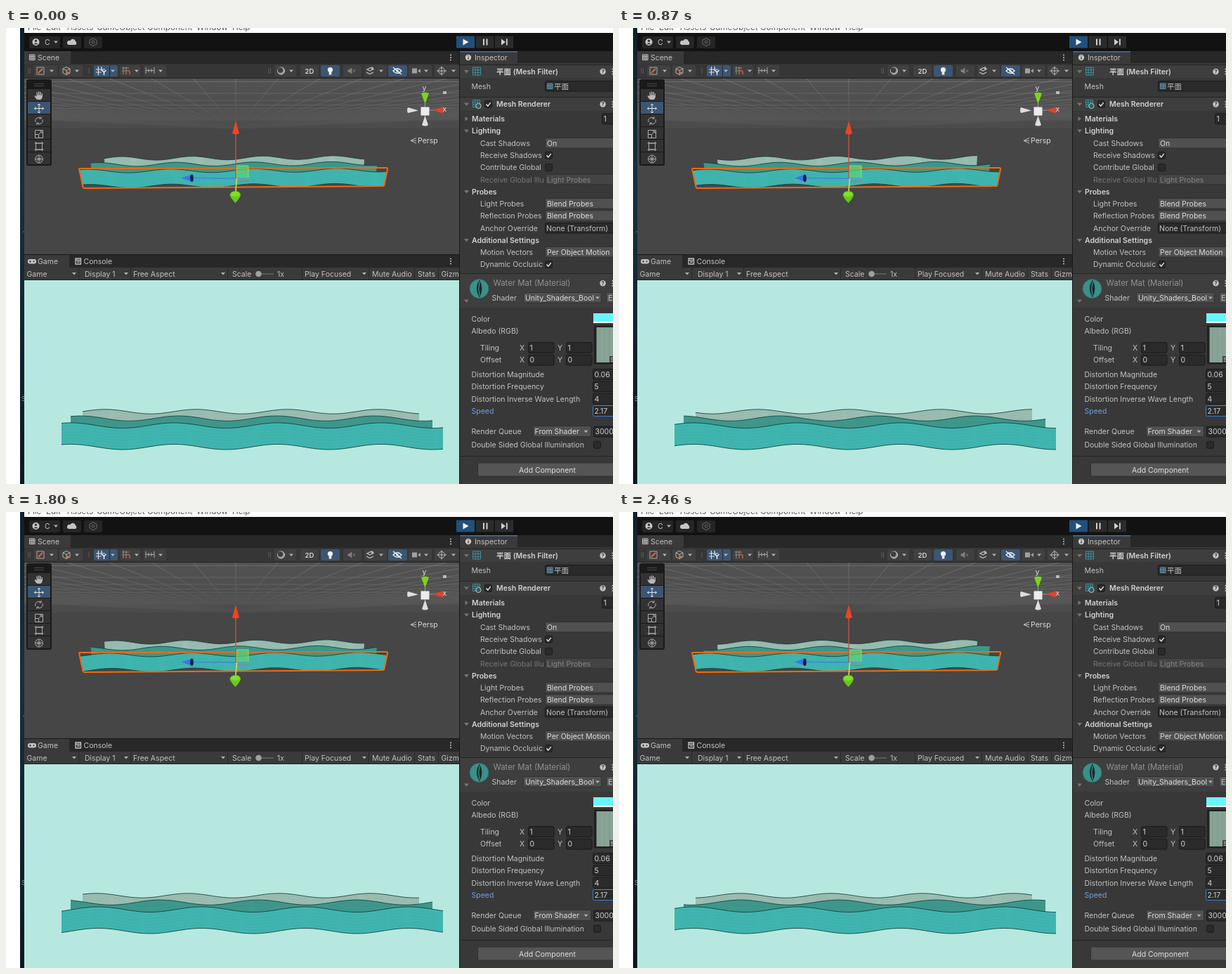
These frames come from a looping animation (864 px wide and 649 px high, 2.49 s). An HTML page:

```html
<!DOCTYPE html>
<html lang="en">
<head>
<meta charset="utf-8">
<title>Water shader editor</title>
<style>
html, body { margin: 0; width: 100%; height: 100%; overflow: hidden; background: #fff; }
svg { display: block; width: 864px; height: 649px; }
text { font-family: Inter, "Noto Sans CJK SC", "Noto Sans CJK", sans-serif; font-size: 10.5px; white-space: pre; }
</style>
</head>
<body>
<svg id="stage" viewBox="0 0 864 649" xmlns="http://www.w3.org/2000/svg"></svg>
<script>
const LOOP = 2490, STEP = 30, TAU = Math.PI * 2;
const INK = '#c2c2c2', FIELD = '#2a2a2a', DROP = '#505050', ACTIVE = '#3b5674';
const out = [];
const add = s => out.push(s);

// Drawing helpers
const rect = (x, y, w, h, fill, extra = '') =>
  add(`<rect x="${x}" y="${y}" width="${w}" height="${h}" fill="${fill}" ${extra}/>`);
const text = (x, mid, s, fill = INK, extra = '') =>
  add(`<text x="${x}" y="${mid + 3.8}" fill="${fill}" ${extra}>${s}</text>`);
const bold = (x, mid, s) => text(x, mid, s, '#d2d2d2', 'font-weight="600"');
const path = (d, fill = 'none', stroke = 'none', w = 1, extra = '') =>
  add(`<path d="${d}" fill="${fill}" stroke="${stroke}" stroke-width="${w}" ${extra}/>`);
const circle = (x, y, r, fill = 'none', stroke = 'none', w = 1) =>
  add(`<circle cx="${x}" cy="${y}" r="${r}" fill="${fill}" stroke="${stroke}" stroke-width="${w}"/>`);
const caret = (x, y) => path(`M${x - 3} ${y - 1.5}h6l-3 3.5z`, '#b0b0b0');
const fold = (x, y) => path(`M${x - 3} ${y - 2}h7l-3.5 4.5z`, '#747474');
const dots = (x, y) => [-3.5, 0, 3.5].forEach(d => circle(x, y + d, 1, '#c4c4c4'));
const box = (x, y, w, h, fill, stroke = '#232323') =>
  rect(x + .5, y + .5, w - 1, h - 1, fill, `rx="2" stroke="${stroke}"`);
const check = (x, y, on) => {
  box(x - 5.5, y - 5.5, 11, 11, FIELD, '#1b1b1b');
  if (on) path(`M${x - 3} ${y}l2.3 2.6 4-5`, 'none', '#e2e2e2', 1.5);
};
const help = y => {
  circle(849.5, y, 4.2, '#c4c4c4');
  add(`<text x="847.4" y="${y + 2.8}" fill="#333" style="font-size:7.5px" font-weight="700">?</text>`);
  dots(863.5, y);
};
const mesh = (x, y, s, color) => {
  let d = '';
  for (let i = 0; i <= 3; i++) d += `M${x + i * s / 3} ${y}v${s}M${x} ${y + i * s / 3}h${s}`;
  path(d, 'none', color, 1);
};

add(`<defs>
<clipPath id="view"><rect x="26" y="72" width="619" height="250"/></clipPath>
<linearGradient id="sky" x2="0" y2="1"><stop stop-color="#525252"/><stop offset="1" stop-color="#4b4b4b"/></linearGradient>
<linearGradient id="fade" x2="0" y2="1"><stop stop-color="#fff" stop-opacity=".5"/><stop offset=".55" stop-color="#fff" stop-opacity=".25"/><stop offset="1" stop-color="#fff" stop-opacity=".02"/></linearGradient>
<mask id="far"><rect x="26" y="72" width="619" height="72" fill="url(#fade)"/></mask>
<linearGradient id="desk" x2="0" y2="1"><stop stop-color="#10202c"/><stop offset=".35" stop-color="#173040"/><stop offset="1" stop-color="#0c1721"/></linearGradient>
</defs>`);

function frameBars() {
  rect(0, 0, 864, 649, '#fff');
  rect(20, 0, 6, 649, 'url(#desk)');
  text(22, 527, 'S', '#8b949a', 'style="font-size:9px"');
  circle(25, 290, .8, '#7d8890');
  rect(26, 0, 838, 7, '#fff');
  [['File', 31], ['Edit', 57], ['Assets', 87], ['GameObject', 129], ['Component', 201],
   ['Window', 271], ['Help', 322]].forEach(([s, x]) =>
    add(`<text x="${x}" y="2.6" fill="#555" style="font-size:11.7px">${s}</text>`));
  rect(26, 7, 838, 642, '#191919');
  rect(26, 7, 838, 26, '#121212');

  [[33, 44], [81, 26], [111, 26]].forEach(([x, w]) => rect(x, 12, w, 17, '#252525', 'rx="2"'));
  circle(42.5, 20, 5, '#c8c8c8');
  circle(42.5, 18.3, 1.7, '#333');
  path('M39.4 23.3q3.1-4 6.2 0z', '#333');
  text(55, 20, 'C');
  caret(71, 20);
  path('M89 24h10a3 3 0 0 0 0-5a4 4 0 0 0-7.5-1a3 3 0 0 0-2.5 6z', '#c4c4c4');
  path('M124 14.5l5 2.8v5.6l-5 2.8-5-2.8v-5.6z', 'none', '#6a6a6a');
  circle(124, 20, 2, 'none', '#6a6a6a');

  rect(641, 11.5, 26, 17, '#22507c');
  rect(668.5, 11.5, 26, 17, '#2b2b2b');
  rect(696, 11.5, 26, 17, '#2b2b2b');
  path('M650.5 15.5v9l8-4.5z', '#f2f2f2');
  path('M679 15.5h2v9h-2zM683.5 15.5h2v9h-2zM705 15.5v9l6-4.5zM712 15.5h1.8v9h-1.8z', '#d0d0d0');
}

function sceneBars() {
  rect(26, 33, 619, 18, '#282828');
  rect(26, 33, 66, 18, '#3a3a3a');
  mesh(33.5, 38, 7.5, '#c4c4c4');
  text(45, 42, 'Scene');
  dots(633, 42);
  rect(26, 51, 619, 21, '#363636');
  rect(26, 71, 619, 1, '#232323');
  [[40, 33], [76, 33], [162, 29], [196, 32], [382, 31], [419, 26], [480, 26], [510, 32],
   [573, 33], [610, 35]].forEach(([x, w]) => rect(x, 53, w, 16, '#404040', 'rx="2"'));
  [[125, 34], [448, 27], [544, 27]].forEach(([x, w]) => rect(x, 53, w, 16, ACTIVE, 'rx="2"'));
  rect(147, 53, 1, 16, '#2b2b2b');
  [65, 101, 152, 186, 220, 406, 534, 598, 637].forEach(x => caret(x, 61));
  path('M32 57v8M34.5 57v8M118 57v8M374 57v8M376.5 57v8', 'none', '#5a5a5a');
  // pivot, cube, grid, snap and ruler
  path('M44 56h10v10h-10z', 'none', '#a8a8a8');
  path('M46 64l6-6', 'none', '#e0703c', 1.8);
  path('M86 55.5l5 2.5v6l-5 2.5-5-2.5v-6zM81 58l5 2.5 5-2.5M86 60.5v6', 'none', '#b4b4b4');
  circle(88, 64, 2, '#e06a35');
  path('M128 59h13M128 63h8M131.5 55v12M136 55v6', 'none', '#e0e0e0', 1.2);
  path('M136.5 60l3 3 3-3M139.5 63v4', 'none', '#fff', 1.3);
  path('M165 57h10M165 61h6M167 55v11M171 55v6', 'none', '#8c8c8c');
  path('M171 66v-3a2.5 2.5 0 0 1 5 0v3', 'none', '#c05f45', 1.5);
  path('M199 56v9M211 56v9M199 60.5h12M203 58v5M207 58v5', 'none', '#aaa');
  // view options
  circle(391.5, 61, 5, '#999', '#ccc');
  circle(390.5, 60, 3.8, '#3d3d3d');
  text(425.5, 61, '2D', '#d8d8d8', 'font-weight="600" style="font-size:9.5px"');
  circle(461.5, 59.5, 3.6, '#f0f0f0');
  rect(459.7, 63, 3.6, 3.5, '#f0f0f0');
  path('M487 59.5h2l3-2.5v8l-3-2.5h-2zM494 59l3 4m0-4l-3 4', '#808080', '#808080', .8);
  path('M514 59l5-2.5 4 2-5 2.5zM513 63l5 2.5 5-2.5M521 55v4M519 57h4', 'none', '#c4c4c4', 1.2);
  path('M551 61q6-6.5 12 0q-6 6.5-12 0zM551 56l12 10', 'none', '#eee', 1.3);
  circle(557, 61, 1.8, '#eee');
  rect(578, 57.5, 7, 7, '#a0a0a0');
  path('M586 61l4-3v6z', '#a0a0a0');
  circle(620, 61, 4.5, 'none', '#bbb');
  path('M613 61h14M620 54.5v13', 'none', '#bbb');
}

function sceneView() {
  rect(26, 72, 619, 250, '#464646');
  rect(26, 72, 619, 71, 'url(#sky)');
  let d = '';
  for (let k = -26; k <= 26; k++) d += `M327 143L${327 + k * 60} 72`;
  for (let j = 3; j < 18; j++) d += `M26 ${143 - 200 / j}H645`;
  add('<g clip-path="url(#view)"><g mask="url(#far)">');
  path(d, 'none', '#a8a8a8', .7);
  add('</g></g>');

  // tool column
  rect(29, 73, 36, 123, '#1a1a1a', 'rx="3"');
  path('M40 79.5h14M40 82.5h14', 'none', '#4a4a4a');
  for (let i = 0; i < 6; i++) rect(31, 87 + i * 18, 32, 17, i === 1 ? ACTIVE : '#323232');
  path('M43 101l-2.5-4 1-1 2 1.5v-6h1.3v4h1v-5h1.4v5h1v-4.5h1.4v5h1v-3h1.3v5q-1 4-3.5 4h-3z', '#b8b8b8');
  path('M47 108v13M40.5 114.5h13M45 110l2-2 2 2M45 119l2 2 2-2M42.5 112.5l-2 2 2 2M51.5 112.5l2 2-2 2', 'none', '#e4e4e4');
  path('M42 134a5 5 0 0 1 8-5.5M52 130a5 5 0 0 1-8 5.5M50 126v3h-3M44 138v-3h3', 'none', '#acacac');
  path('M41.5 145.5h11v11h-11zM41.5 151.5h5v5M47 151l4-4M48 147h3v3', 'none', '#acacac');
  path('M42.5 164h9v9h-9zM40.5 164h13M40.5 173h13M42.5 162v13M51.5 162v13', 'none', '#acacac');
  circle(47, 186.5, 5.5, 'none', '#acacac');
  path('M42 186.5h10M47 181.5v10M44 183.5l6 6M50 183.5l-6 6', 'none', '#acacac');

  // orientation widget
  path('M596.5 117V100M596.5 117H620M596.5 117V138', 'none', '#999', 1);
  path('M591 93q5.5-2.5 11 0l-5.5 15z', '#7bd51c');
  path('M622 112.5q2.5 4.5 0 9l-15-4.5z', '#e0432a');
  path('M572 113q-2 4 0 8l15-3.5z', '#dedede');
  path('M592 138q4.5 3 9 0l-4.5-13z', '#dedede');
  rect(590.5, 112.5, 12, 12, '#ececec');
  text(592.5, 85.5, 'y', '#ddd');
  text(621.5, 115, 'x', '#ddd');
  rect(622, 90, 5, 4, '#bbb');
  path('M584 156.5l-8 3.8 8 3.8M576 160.3h8', 'none', '#ccc', .9);
  text(586, 160.3, 'Persp', '#d8d8d8');
}

function gizmo() {
  path('M104 200.5Q104 200 106 200L541 199Q543.5 199 543 201L538.5 223Q538 225 536 225L112 228Q110 228 109.5 226Z', 'none', '#f26a10', 2);
  rect(328, 196, 17, 17.5, '#5fd07a', 'fill-opacity=".75"');
  path('M328 213V196H345V213', 'none', '#8ee04a', 1);
  path('M328 214H345', 'none', '#5f8bff', 1);
  path('M329 218H346', 'none', '#d4694a', 1);
  path('M327 214V150', 'none', '#c25440', 1.4);
  path('M322 150q5 3 10 0l-5-18z', '#ee4422');
  path('M327 214L266 213.5', 'none', '#3d83e8', 1.4);
  path('M249.5 213.5L265 208.5V219z', '#3a74f2');
  add('<ellipse cx="264.5" cy="213.7" rx="2.4" ry="5.2" fill="#10204a"/>');
  path('M328.5 214L326.8 234', 'none', '#d3e046', 1.6);
  path('M318.5 238q1-6 8-6t7.5 6q-1 4-7.5 11q-6-6-8-11z', '#67c81c');
  add('<ellipse cx="326.3" cy="236.5" rx="6.5" ry="3.6" fill="#7fe02a"/>');
}

function gameBars() {
  rect(26, 323, 619, 18, '#282828');
  rect(26, 323, 64, 18, '#3a3a3a');
  rect(31, 329, 12, 6.5, '#c4c4c4', 'rx="3"');
  path('M33 332.3h3M34.5 330.8v3', 'none', '#333', .9);
  circle(39.5, 332.3, 1, '#333');
  text(45, 332, 'Game');
  path('M99 328h7.5v8h-7.5zM99 330.5h7.5M101 333h4', 'none', '#c4c4c4', 1.3);
  text(110.5, 332, 'Console');
  dots(633, 332);
  rect(26, 341, 619, 17, '#3a3a3a');
  rect(26, 358, 619, 1, '#232323');
  [103, 177, 315, 421, 516, 581, 615].forEach(x => rect(x, 341, 1, 17, '#2a2a2a'));
  [['Game', 29.5], ['Display 1', 112], ['Free Aspect', 181], ['Scale', 322], ['1x', 386],
   ['Play Focused', 425], ['Mute Audio', 521], ['Stats', 586], ['Gizm', 619.5]]
    .forEach(([s, x]) => text(x, 350, s));
  [97, 171, 309, 510].forEach(x => caret(x, 349.5));
  rect(356, 349.3, 25, 1.4, '#686868');
  circle(359.5, 350, 4.3, '#a0a0a0');
  rect(26, 359, 619, 290, '#b6e8df');
}

function inspector() {
  rect(645, 33, 219, 616, '#191919');
  rect(646, 33, 218, 17, '#282828');
  rect(646, 33, 82, 17, '#3a3a3a');
  rect(646, 33, 82, 1.5, '#3a72b0');
  circle(658, 42, 4.2, '#c8c8c8');
  path('M658 41.5v3M658 39v1.3', 'none', '#333', 1.3);
  text(667, 42, 'Inspector');
  rect(646, 50, 218, 599, '#383838');

  const header = (y, h) => { rect(646, y, 218, h, '#3e3e3e'); rect(646, y, 218, 1, '#242424'); };
  const drop = (y, s, on = true) => {
    box(767, y - 8, 110, 15.5, on ? DROP : '#444', '#303030');
    text(770, y, s, on ? '#dcdcdc' : '#858585');
  };
  const field = (x, y, w, s, ring) => {
    box(x, y - 8, w, 16, FIELD, ring || '#1a1a1a');
    text(x + 2.5, y, s, '#d0d0d0');
  };

  header(52, 19);
  fold(655, 62);
  mesh(664.5, 56, 11, '#3f8f98');
  bold(698, 62, '平面 (Mesh Filter)');
  help(62);
  text(662.5, 83, 'Mesh');
  box(767, 75, 110, 15.5, FIELD, '#1a1a1a');
  mesh(770.5, 79, 7.5, '#5d9db4');
  text(780, 83, '平面');

  header(98, 20);
  fold(655, 108.5);
  mesh(664.5, 102.5, 10, '#3f8f98');
  circle(672.5, 111, 3.6, '#2c5d66', '#b6c5c5');
  check(686.5, 108.5, true);
  bold(698, 108.5, 'Mesh Renderer');
  help(108.5);
  path('M653.5 126l4.5 3-4.5 3.5z', '#747474');
  bold(663, 129.3, 'Materials');
  field(848, 129.3, 30, '1');
  [['Lighting', 146.5], ['Probes', 233], ['Additional Settings', 302]].forEach(([s, y]) => {
    fold(655, y);
    bold(663, y, s);
  });
  [['Cast Shadows', 164], ['Receive Shadows', 181.3], ['Contribute Global', 198.5],
   ['Light Probes', 250], ['Reflection Probes', 267.3], ['Anchor Override', 284.7],
   ['Motion Vectors', 319], ['Dynamic Occlusic', 336.5]].forEach(([s, y]) => text(675, y, s));
  text(675, 215.7, 'Receive Global Illu', '#777');
  drop(164, 'On');
  check(772.5, 181.3, true);
  check(772.5, 198.5, false);
  drop(215.7, 'Light Probes', false);
  drop(250, 'Blend Probes');
  drop(267.3, 'Blend Probes');
  box(767, 277, 110, 15.5, FIELD, '#1a1a1a');
  text(769, 284.7, 'None (Transform)');
  drop(319, 'Per Object Motion');
  check(772.5, 336.5, true);

  header(349, 49);
  circle(673.5, 371, 13.5, '#3b9087', '#2b6d68', .8);
  path('M674 358.5q-8 12 0 25q7-12 0-25z', '#172c2d');
  path('M674 361q-2.5 10 0 20', 'none', '#49a79e', 1);
  fold(655, 388.5);
  text(693.5, 363.3, 'Water Mat (Material)', '#929292', 'style="font-size:11.4px"');
  help(363.3);
  text(691.5, 384, 'Shader');
  box(736, 376, 112, 15.5, DROP, '#303030');
  text(739, 384, 'Unity_Shaders_Bool', '#dcdcdc');
  caret(842, 384);
  box(854, 376, 20, 15.5, '#555', '#303030');
  text(857, 384, 'E');

  text(662.5, 414, 'Color');
  rect(836, 406, 28, 14, '#68f5ff');
  rect(836, 418, 28, 2, '#fff');
  text(662.5, 431, 'Albedo (RGB)');
  rect(837, 423.5, 27, 55, '#202020');
  rect(840.5, 426, 23.5, 50, '#87a497');
  path('M845 426v50M852 426v50M859 426v50', 'none', '#7a988b', .7);
  rect(859, 467, 5, 9, '#454545');
  text(860.5, 471.5, 'S', '#ddd', 'style="font-size:8px"');
  [['Tiling', 455, 1], ['Offset', 472.5, 0]].forEach(([s, y, v]) => {
    text(675, y, s);
    text(731, y, 'X');
    field(743, y, 37.5, v);
    text(785, y, 'Y');
    field(797, y, 37.5, v);
  });
  [['Distortion Magnitude', 493, '0.06'], ['Distortion Frequency', 510.3, '5'],
   ['Distortion Inverse Wave Length', 527.7, '4'], ['Speed', 545, '2.17']].forEach(([s, y, v]) => {
    const active = s === 'Speed';
    text(662.5, y, s, active ? '#6d9fe0' : INK);
    field(835, y, 40, v, active ? '#3d7fc6' : '');
  });
  text(662.5, 574.5, 'Render Queue');
  box(750, 566, 83, 16, DROP, '#303030');
  text(752.5, 574.3, 'From Shader', '#dcdcdc');
  caret(825.5, 574.3);
  field(836, 574.5, 40, '3000');
  text(662.5, 593.3, 'Double Sided Global Illumination');
  check(841.5, 593.3, false);
  rect(646, 609, 218, 1, '#242424');
  box(671, 618.5, 210, 20, '#555', '#303030');
  text(730, 629, 'Add Component', '#dedede');
}

// Water strips share one wavelength in world space; only the frequency differs.
// Views hold: left, right, mean top, amplitude, height.
const WAVES = 3.69, BASE = 3970;
const strips = [
  { freq: 2, phase: .246, fill: '#9ebdb1', game: [109, 588, 546, 3.2, 24], scene: [140, 510, 185, 2.6, 16], slant: 1 },
  { freq: 4, phase: .1, fill: '#3f978b', game: [92, 607, 555.7, 3.6, 24], scene: [120.5, 528, 193.6, 2.7, 19], slant: 2 },
  { freq: 5, phase: .09, fill: '#40b5af', game: [79, 622, 565.7, 3.8, 30.5], scene: [105, 542, 203, 2.6, 21.5], slant: 4 }
];
const STREAKS = 7;
const live = [];
function addStrips(kind) {
  strips.forEach((s, i) => {
    const id = kind + i;
    add(`<g fill="none"><path id="${id}" fill="${s.fill}"/><path id="${id}e" stroke="#14423f" stroke-width=".9"/>`);
    add(`<path id="${id}s" stroke="#2b7f7c" stroke-width=".6" stroke-opacity=".2" stroke-dasharray="37 9 61 5 18 12"/></g>`);
    live.push({ s, kind, id });
  });
}

frameBars();
sceneBars();
sceneView();
addStrips('scene');
gizmo();
gameBars();
addStrips('game');
inspector();
document.getElementById('stage').innerHTML = out.join('');
for (const l of live)
  [l.body, l.edge, l.streak] = ['', 'e', 's'].map(k => document.getElementById(l.id + k));

function curve({ s, kind }, t, drop, back) {
  const [x0, x1, mid, amp, h] = s[kind];
  const inScene = kind === 'scene';
  const inset = inScene ? s.slant * drop / h : 0;
  const shift = s.phase + t * s.freq / BASE;
  const pts = [];
  for (let i = 0; i <= 120; i++) {
    const u = i / 120;
    const x = x0 + inset + (x1 - x0 - 2 * inset) * u;
    const tilt = inScene ? (.5 - u) * 1.5 : 0;
    const y = mid + drop + tilt - amp * Math.cos(TAU * (u * WAVES - shift));
    pts.push(`${x.toFixed(2)} ${y.toFixed(2)}`);
  }
  return (back ? pts.reverse() : pts).join('L');
}

function draw(t) {
  for (const l of live) {
    const h = l.s[l.kind][4];
    const top = curve(l, t, 0);
    l.body.setAttribute('d', `M${top}L${curve(l, t, h, true)}Z`);
    l.edge.setAttribute('d', `M${top}M${curve(l, t, h)}`);
    let d = '';
    for (let i = 1; i < STREAKS; i++) d += `M${curve(l, t, h * i / STREAKS)}`;
    l.streak.setAttribute('d', d);
    l.streak.setAttribute('stroke-dashoffset', (-t * .12).toFixed(1));
  }
}

const start = performance.now();
function tick() {
  const t = (performance.now() - start) % LOOP;
  draw(Math.floor(t / STEP) * STEP);
  requestAnimationFrame(tick);
}
tick();
</script>
</body>
</html>
```
